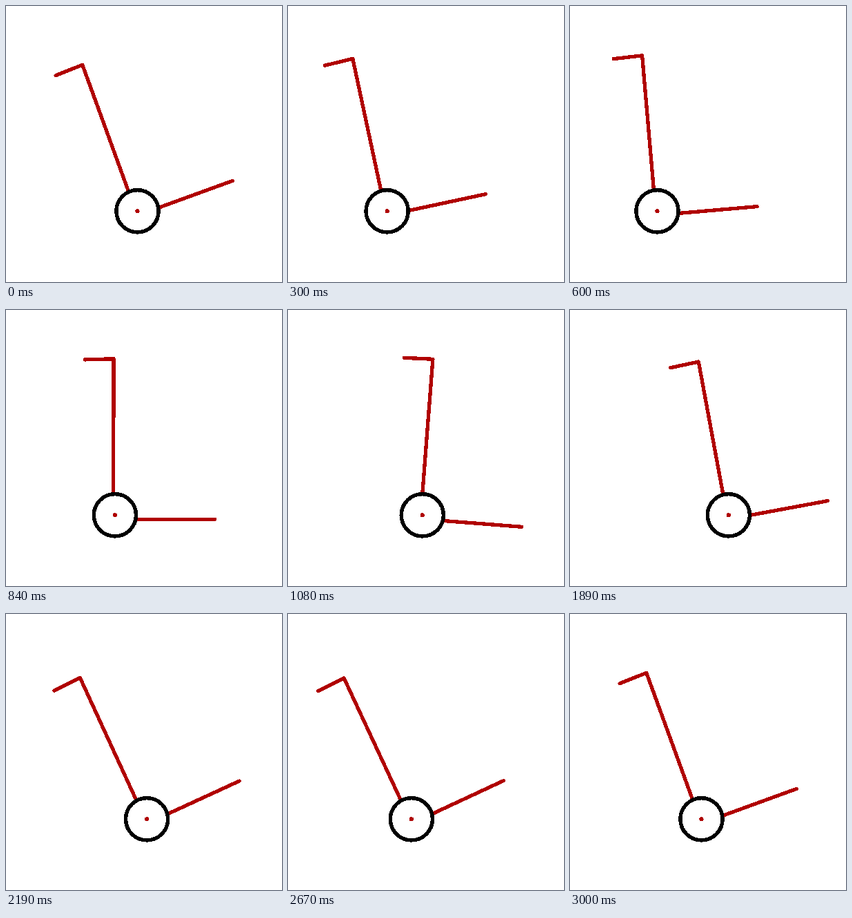
An HTML page for the animation above (5.03 s loop, 400 by 400 pixels).

```html
<!DOCTYPE html>
<html lang="en">
<head>
<meta charset="utf-8">
<title>Balancing hand truck</title>
<style>
  html, body { margin: 0; width: 100%; height: 100%; overflow: hidden; background: #fff; }
  svg { display: block; width: 100%; height: 100%; shape-rendering: crispEdges; }
  .frame { fill: none; stroke: #b00000; stroke-width: 5.3; stroke-linecap: round; stroke-linejoin: round; }
  .wheel { fill: #fff; stroke: #000; stroke-width: 5.5; }
  .axle { fill: #b00000; }
</style>
</head>
<body>
<svg viewBox="0 0 400 400">
  <g id="truck">
    <path id="body" class="frame" d="M-44 -225.3L-2.4 -226.5V5.8H144.7"/>
    <circle class="wheel" r="30.6"/>
    <circle class="axle" r="3.1"/>
  </g>
</svg>
<script>
const LOOP = 5030, MOVE = 3000, STEP = 30, AXLE_Y = 297.3;

// Easings; a skew below 1 moves the fast part of a swing earlier
const swing = (skew = 1) => u => (1 - Math.cos(Math.PI * u ** skew)) / 2;
const easeIn = u => u ** 1.35;
const easeOut = u => 1 - (1 - u) ** 1.33;
const steep = u => u ** 3 * (10 - 15 * u + 6 * u * u);

// Turning points of each motion, with the easing that leads there
const wheelX = {
  from: 190.5,
  moves: [
    { until: 525, to: 122.2, ease: swing(0.85) },
    { until: 1645, to: 238.4, ease: swing(0.775) },
    { until: 2640, to: 178.7, ease: swing() },
    { until: MOVE, to: 190.5, ease: swing() }
  ]
};
const leanLeft = {
  from: 20,
  moves: [
    { until: 1330, to: -7.4, ease: easeOut },
    { until: 2430, to: 27.2, ease: steep },
    { until: MOVE, to: 20, ease: easeIn }
  ]
};

const truck = document.getElementById('truck');
const body = document.getElementById('body');

function valueAt(t, { from, moves }) {
  let begin = 0;
  for (const { until, to, ease } of moves) {
    if (t <= until) return from + (to - from) * ease((t - begin) / (until - begin));
    begin = until;
    from = to;
  }
  return from;
}

function draw(now) {
  const t = Math.min(MOVE, Math.floor((now % LOOP) / STEP) * STEP);
  truck.setAttribute('transform', `translate(${valueAt(t, wheelX)} ${AXLE_Y})`);
  body.setAttribute('transform', `rotate(${-valueAt(t, leanLeft)})`);
}

const start = performance.now();
function tick() {
  draw(performance.now() - start);
  requestAnimationFrame(tick);
}
tick();
</script>
</body>
</html>
```
